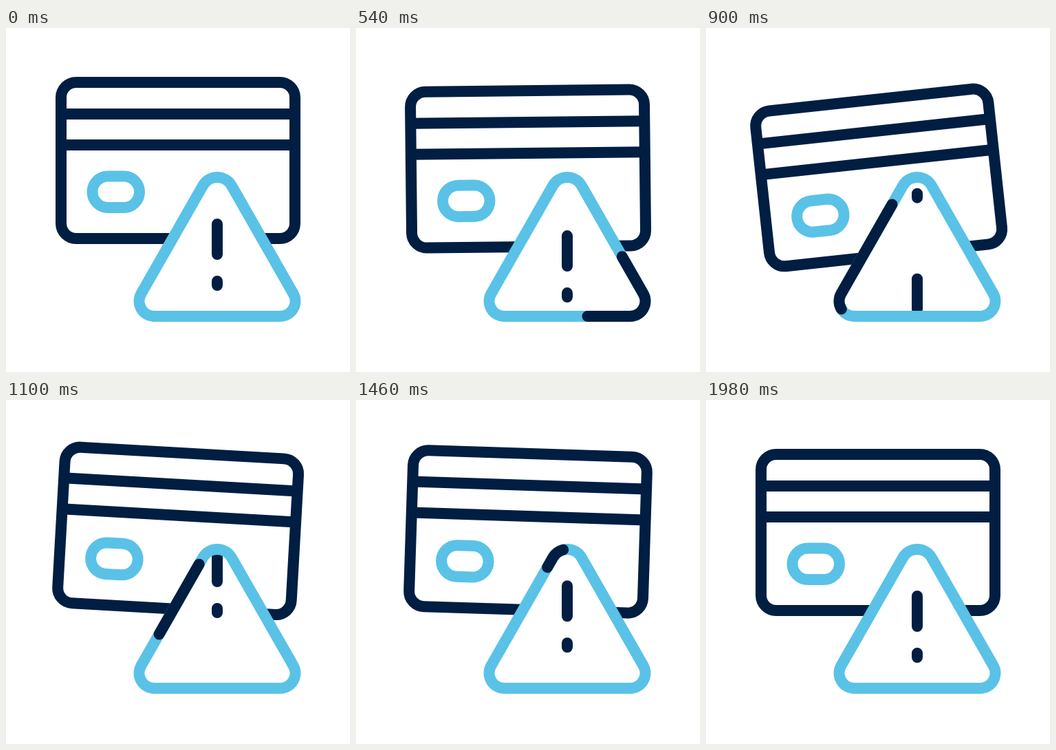
Recreate the animation shown at these times as an HTML page. Size 500x500 px, loop 2000 ms.

```html
<!DOCTYPE html>
<html lang="en">
<head>
<meta charset="utf-8">
<title>Card alert</title>
<style>
  html, body { margin: 0; width: 100%; height: 100%; overflow: hidden; background: #fff; }
  svg { display: block; width: 100%; height: 100%; }
  .line { fill: none; stroke-width: 16; stroke-linecap: round; stroke-linejoin: round; }
  .navy { stroke: #001e42; }
  .sky { stroke: #5ac2e7; }
</style>
</head>
<body>
<svg viewBox="0 0 500 500">
  <defs>
    <path id="triangle" pathLength="1" d="M307 217A24 24 0 0 1 327.8 229L417.5 386A22 22 0 0 1 398.5 419H215.5A22 22 0 0 1 196.5 386L286.2 229A24 24 0 0 1 307 217"/>
    <clipPath id="inside"><use href="#triangle"/></clipPath>
    <path id="mark" d="M307 285V329M307 368V374"/>
  </defs>
  <g id="card" class="line">
    <rect class="navy" x="80" y="79" width="340" height="227" rx="22"/>
    <path class="navy" stroke-linecap="butt" d="M80 125H420M80 170H420"/>
    <rect class="sky" x="125.5" y="215.5" width="68.5" height="45.5" rx="22.7"/>
  </g>
  <use href="#triangle" fill="#fff"/>
  <g clip-path="url(#inside)">
    <g id="marks" class="line navy">
      <use href="#mark"/>
      <use href="#mark" y="-207"/>
    </g>
  </g>
  <use href="#triangle" class="line sky"/>
  <path id="runner" class="line navy" pathLength="1"/>
</svg>
<script>
const LOOP = 2000;
const MARK_TRAVEL = 207;
const el = id => document.getElementById(id);
const card = el('card'), marks = el('marks'), runner = el('runner');
runner.setAttribute('d', el('triangle').getAttribute('d'));

// Monotone cubic curve through [time, value] keys, at rest at both ends.
function track(...keys) {
  const slope = i => (keys[i + 1][1] - keys[i][1]) / (keys[i + 1][0] - keys[i][0]);
  const tangents = keys.map((_, i) => {
    if (i === 0 || i === keys.length - 1) return 0;
    const a = slope(i - 1), b = slope(i);
    return a * b > 0 ? 2 * a * b / (a + b) : 0;
  });
  return t => {
    if (t <= keys[0][0]) return keys[0][1];
    const i = keys.findIndex(k => k[0] > t) - 1;
    if (i < 0) return keys[keys.length - 1][1];
    const [t0, v0] = keys[i], [t1, v1] = keys[i + 1];
    const span = t1 - t0, u = (t - t0) / span, w = 1 - u;
    return v0 * (1 + 2 * u) * w * w + v1 * u * u * (3 - 2 * u)
      + span * u * w * (tangents[i] * w - tangents[i + 1] * u);
  };
}

// Cubic-bezier timing (x1, 0, x2, 1), solved by bisection.
function ease(x, x1, x2) {
  let lo = 0, hi = 1;
  for (let i = 0; i < 24; i++) {
    const s = (lo + hi) / 2, r = 1 - s;
    if (3 * s * r * (r * x1 + s * x2) + s ** 3 < x) lo = s; else hi = s;
  }
  return lo * lo * (3 - 2 * lo);
}

const tilt = track([490, 0], [540, -0.6], [785, -8.5], [900, -6.2], [1100, 3.2],
  [1215, 6.5], [1340, 4.5], [1620, -1.2], [1680, -1.6], [1980, 0]);
const drop = track([0, 0], [500, 10.4], [900, 8.3], [1100, 6.6], [1340, 4.6], [1620, 3], [1980, 0]);
const head = track([0, 0], [540, 0.456], [900, 0.917], [1100, 0.947], [1340, 0.978], [1600, 1]);
const tail = track([0, 0], [540, 0.209], [900, 0.665], [1100, 0.776], [1340, 0.895], [1620, 0.993], [1640, 1]);

function draw(t) {
  card.setAttribute('transform', `translate(0 ${drop(t)}) rotate(${tilt(t)} 405 190)`);
  marks.setAttribute('transform', `translate(0 ${MARK_TRAVEL * ease(t / LOOP, 0.675, 0.29)})`);
  const start = tail(t), length = head(t) - start;
  runner.style.display = length > 0.0005 ? '' : 'none';
  runner.setAttribute('stroke-dasharray', `${Math.max(length, 0)} 2`);
  runner.setAttribute('stroke-dashoffset', -start);
}

function tick() {
  draw(performance.now() % LOOP);
  requestAnimationFrame(tick);
}
draw(0);
requestAnimationFrame(tick);
</script>
</body>
</html>
```
